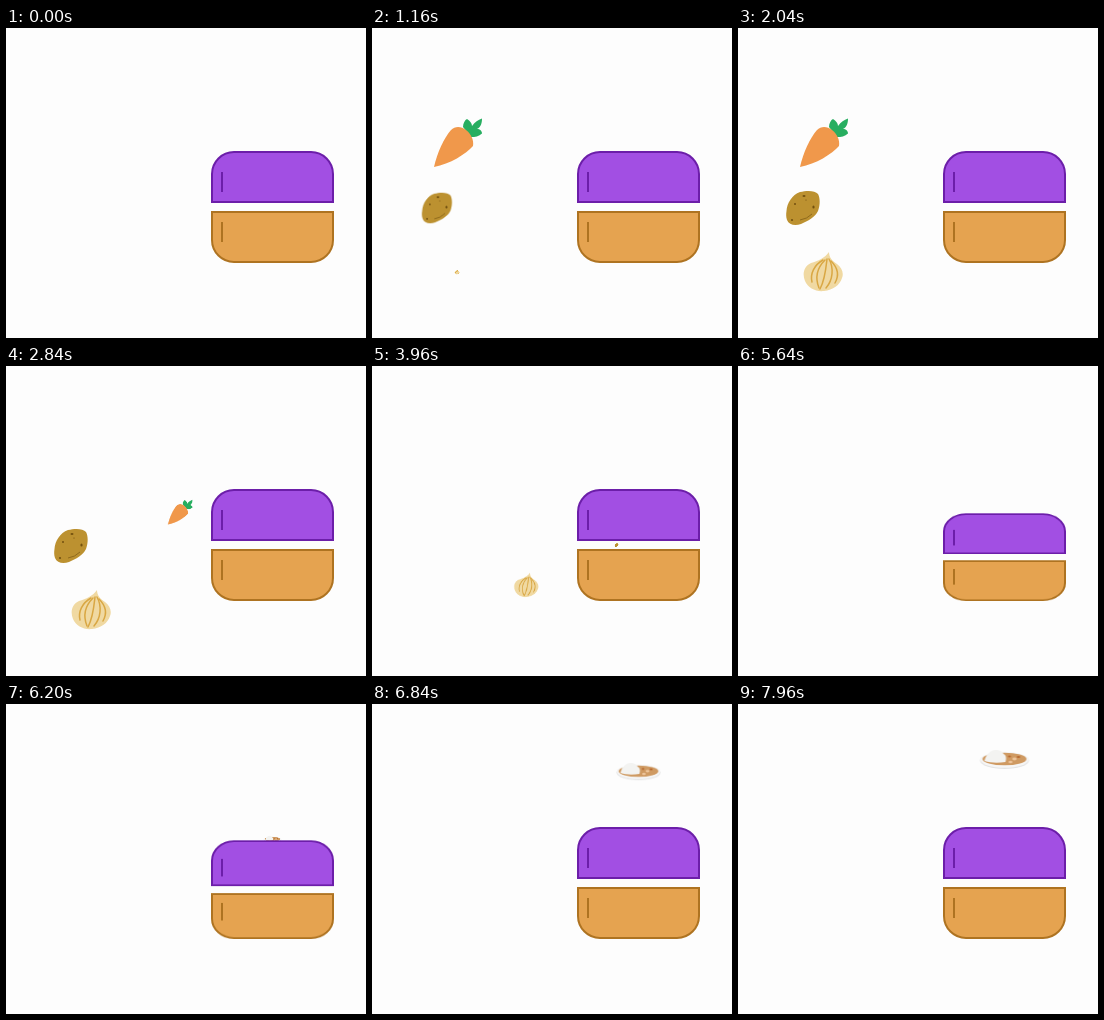
An HTML page for the animation above (8 s loop, 360 by 310 pixels).

```html
<!DOCTYPE html>
<html lang="en">
<head>
<meta charset="utf-8">
<title>Curry machine</title>
<style>
html, body { margin: 0; width: 100%; height: 100%; overflow: hidden; background: #fdfdfd; }
svg { display: block; width: 100vw; height: 100vh; }
.move { animation: 8s ease infinite both; transform-origin: 0 0; }
#carrot { animation-name: carrot; }
#potato { animation-name: potato; }
#onion { animation-name: onion; }
#dish { animation-name: dish; }
#pot { animation-name: squash; transform-origin: 266px 235px; }

/* Each vegetable pops up, waits, then shrinks into the pot. */
@keyframes carrot {
  0%, .5% { transform: translate(0px, 0px) scale(0); }
  13%, 29.75% { transform: translate(0px, 0px) scale(1); }
  49.75%, 100% { transform: translate(180px, 64px) scale(0); }
}
@keyframes potato {
  0%, 6.75% { transform: translate(0px, 0px) scale(0); }
  19.25%, 37.25% { transform: translate(0px, 0px) scale(1); }
  57.25%, 100% { transform: translate(201px, -1px) scale(0); }
}
@keyframes onion {
  0%, 13% { transform: translate(0px, 0px) scale(0); }
  25.5%, 44.75% { transform: translate(0px, 0px) scale(1); }
  64.75%, 100% { transform: translate(181px, -65px) scale(0); }
}
@keyframes dish {
  0%, 73% { transform: translate(0px, 124px) scale(0); }
  93%, 100% { transform: translate(0px, 0px) scale(1); }
}
@keyframes squash {
  0%, 64.5% { transform: scaleY(1); }
  74.5% { transform: scaleY(.755); }
  84.5%, 100% { transform: scaleY(1); }
}
</style>
</head>
<body>
<svg viewBox="0 0 360 310">
  <g transform="translate(86 115)">
    <g id="carrot" class="move">
      <path fill="#27ae60" d="M5 -16C5 -20 7 -23 9 -24C12 -22 14 -20 14 -17C17 -21 20 -23 24 -24.500C24 -20 23 -16 19 -14C22 -14 24 -12 24 -9.500C21 -6.500 17 -6 13 -6Z"/>
      <path fill="#f0984b" d="M-24 24C-21 10 -14 -5 -7 -13C-3 -17 3 -17 8 -13C13 -9 16 -3 15 3C8 11 -8 21 -24 24Z"/>
    </g>
  </g>

  <g transform="translate(65 180)">
    <g id="potato" class="move">
      <path fill="#bc9130" d="M-16.500 3C-16 -5 -11 -13 -3 -16C3 -17.500 12 -18 15 -14C17 -10 17.500 -4 15 3C12 9 5 13 -2 16C-8 18 -14 17 -16 12C-17 9 -17 6 -16.500 3Z"/>
      <g fill="#73510f">
        <circle cx="-8" cy="-4" r="1"/>
        <ellipse cx="1" cy="-12" rx="1.500" ry="1"/>
        <ellipse cx="10.500" cy="-1" rx="1.100" ry="1.500"/>
        <circle cx="-11" cy="12" r="1.100"/>
        <circle cx="3" cy="-8" r=".6"/>
      </g>
      <path fill="none" stroke="#8f6a1c" d="M-3 12Q4 11 9 6"/>
    </g>
  </g>

  <g transform="translate(85 244)">
    <g id="onion" class="move">
      <path fill="#f0d9a2" d="M6 -20C6 -15 9 -11 14 -8C19 -4 21 1 19 6C17 13 10 18 1 19C-7 20 -15 16 -18 9C-21 2 -19 -6 -12 -9C-5 -11 2 -14 6 -20Z"/>
      <g fill="none" stroke="#d9a743" stroke-width="1.500" stroke-linecap="round">
        <path d="M0 -12C-9 -7 -13 2 -11 10"/>
        <path d="M2 -12C-6 -4 -8 6 -4 16"/>
        <path d="M4 -13C3 -4 2 8 -3 17"/>
        <path d="M6 -13C11 -4 10 8 3 16"/>
        <path d="M8 -11C15 -4 16 4 12 11"/>
      </g>
    </g>
  </g>

  <g transform="translate(266.500 55)">
    <g id="dish" class="move">
      <ellipse cy="1.500" rx="24.500" ry="8.500" fill="#e4e4e4"/>
      <ellipse cy=".8" rx="24" ry="8" fill="#f6f6f6"/>
      <ellipse cx="0" cy="0" rx="22" ry="6.300" fill="#cf9a62"/>
      <path fill="#f3f3f1" d="M-20 2C-19 -3 -15 -9 -9 -9C-5 -9 -2 -8 -1 -5C2 -4 2 0 1 3C-6 4 -14 4 -20 2Z"/>
      <g fill="#edc49a">
        <ellipse cx="6" cy="3" rx="2" ry="1.300"/>
        <ellipse cx="10" cy="0" rx="2.200" ry="1.400"/>
      </g>
      <g fill="#b8692f">
        <ellipse cx="14" cy="-2" rx="1.800" ry="1"/>
        <ellipse cx="5" cy="-2.500" rx="1.500" ry="1"/>
      </g>
    </g>
  </g>

  <g id="pot" class="move" stroke-width="2">
    <g fill="#a24fe3" stroke="#6c1ea9">
      <path d="M206 174V146A22 22 0 0 1 228 124H305A22 22 0 0 1 327 146V174Z"/>
      <path d="M216 144V164"/>
    </g>
    <g fill="#e5a350" stroke="#ae7321">
      <path d="M206 184H327V212A22 22 0 0 1 305 234H228A22 22 0 0 1 206 212Z"/>
      <path d="M216 194V214"/>
    </g>
  </g>
</svg>
</body>
</html>
```
